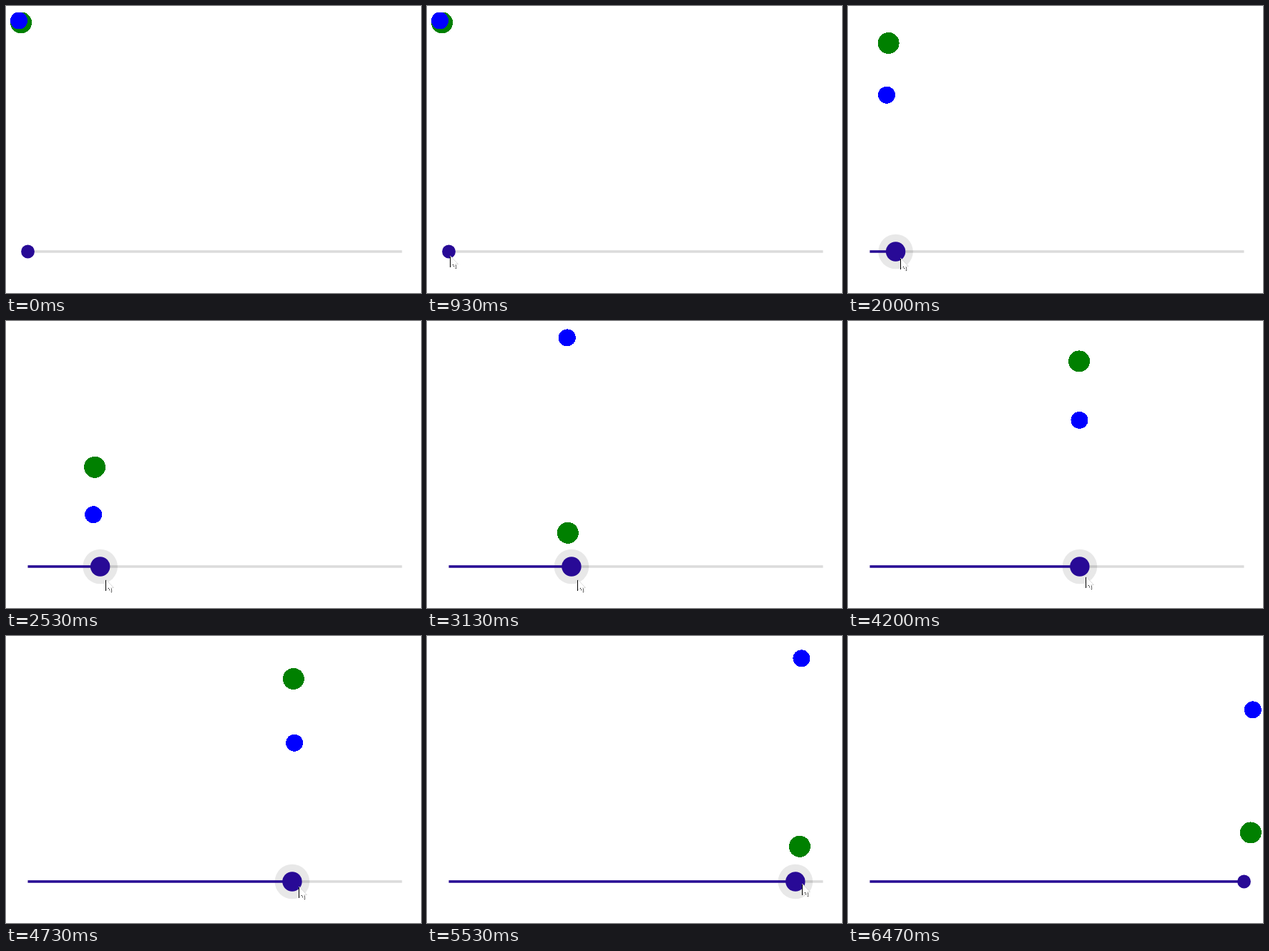
An HTML page for the animation above (7190 ms loop, 580x402 px).

```html
<!DOCTYPE html>
<html lang="en">
<head>
<meta charset="utf-8">
<title>Slider driven motion</title>
<style>
  html, body { margin: 0; width: 100%; height: 100%; overflow: hidden; background: #fff; }
  svg { display: block; width: 580px; height: 402px; }
</style>
</head>
<body>
<svg viewBox="0 0 580 402">
  <g shape-rendering="crispEdges">
    <circle id="green" r="15" fill="#008000"/>
    <circle id="blue" r="12" fill="#00f"/>
  </g>
  <rect x="30.5" y="342.2" width="523" height="3.5" fill="#dbdbdb"/>
  <circle id="halo" cy="344" fill="#000" fill-opacity=".09"/>
  <rect id="fill" x="30.5" y="342.2" height="3.5" fill="#280a96"/>
  <circle id="thumb" cy="344" fill="#280a96"/>
  <g id="pointer" fill="none">
    <path d="M0 0V15L4 12L7 18L9 17L7 11.5H11Z" fill="#fff" stroke="#ccc" stroke-width=".7"/>
    <path d="M0 1V16" stroke="#000"/>
    <path d="M4 12L7 18L9 17L7 11.5" stroke="#000" stroke-dasharray="1 1.5" shape-rendering="crispEdges"/>
  </g>
</svg>
<script>
const LOOP = 7190, STEP = 1000 / 15;
const TRACK = { left: 30.5, width: 523 };
const FIELD = { left: 6.1, top: 8.5, width: 571.7, height: 304 };
const ENTER = 2, REST = 14, PRESS = 22, RELEASE = 87, LEAVE = 92, THUMB_STEPS = 6;

// The hand's pace (step, progress) and its height along the track (progress, y).
const pace = [[PRESS, 0], [30, .0656], [38, .19], [43, .271], [56, .441], [71, .703], [87.2, 1]];
const height = [[0, 350], [.2, 362], [.44, 362], [.7, 351], [1, 346]];

const clamp = x => Math.min(1, Math.max(0, x));
const mix = (a, b, t) => a + (b - a) * t;
const smooth = t => t * t * (3 - 2 * t);
const set = (id, attrs) => {
  for (const name in attrs) document.getElementById(id).setAttribute(name, attrs[name]);
};

// Monotone cubic curve through a few points, starting from rest.
function curve(points, x) {
  const last = points.length - 1;
  if (x <= points[0][0]) return points[0][1];
  if (x >= points[last][0]) return points[last][1];
  const secant = i => (points[i + 1][1] - points[i][1]) / (points[i + 1][0] - points[i][0]);
  const slope = i => {
    if (i === 0) return 0;
    if (i === last) return secant(last - 1);
    const a = secant(i - 1), b = secant(i);
    return a * b > 0 ? 2 * a * b / (a + b) : 0;
  };
  const i = points.findIndex(p => p[0] > x) - 1;
  const h = points[i + 1][0] - points[i][0], u = (x - points[i][0]) / h, v = 1 - u;
  return mix(points[i][1], points[i + 1][1], smooth(u))
    + h * u * v * (slope(i) * v - slope(i + 1) * u);
}

function placeBall(id, radius, frequency, p) {
  const size = 2 * radius;
  set(id, {
    cx: FIELD.left + radius + (FIELD.width - size) * p,
    cy: FIELD.top + radius + (FIELD.height - size) * (1 - Math.cos(frequency * p)) / 2
  });
}

function placePointer(s, p, thumbX) {
  const entering = 1 - smooth(clamp((s - ENTER) / (REST - ENTER)));
  const leaving = clamp((s - RELEASE) / (LEAVE - RELEASE));
  const x = thumbX + 1.5 + 8.5 * p ** .2 + 243 * entering + 18 * leaving;
  const y = curve(height, p) + 30 * entering;
  set('pointer', {
    transform: `translate(${Math.floor(x) + .5} ${Math.round(y)})`,
    visibility: s >= ENTER && s < LEAVE ? 'visible' : 'hidden'
  });
}

function draw(time) {
  const s = Math.floor((time + 7) / STEP);
  const ease = start => 1 - (1 - clamp((s - start) / THUMB_STEPS)) ** 4;
  const pressed = ease(PRESS - .5) - ease(RELEASE);
  const p = curve(pace, s);
  // The thumb runs slightly ahead of the balls while dragged.
  const travel = p > 0 ? Math.min(TRACK.width, TRACK.width * p + 1.8) : 0;
  const x = TRACK.left + travel;

  placeBall('green', 15, 10, p);
  placeBall('blue', 12, 20, p);
  set('fill', { width: travel });
  set('thumb', { cx: x, r: 9.4 + 4.3 * pressed });
  set('halo', { cx: x, r: s < RELEASE ? 24.3 * pressed : 0 });
  placePointer(s, p, x);
}

const began = performance.now();
function tick() {
  draw((performance.now() - began) % LOOP);
  requestAnimationFrame(tick);
}
tick();
</script>
</body>
</html>
```
